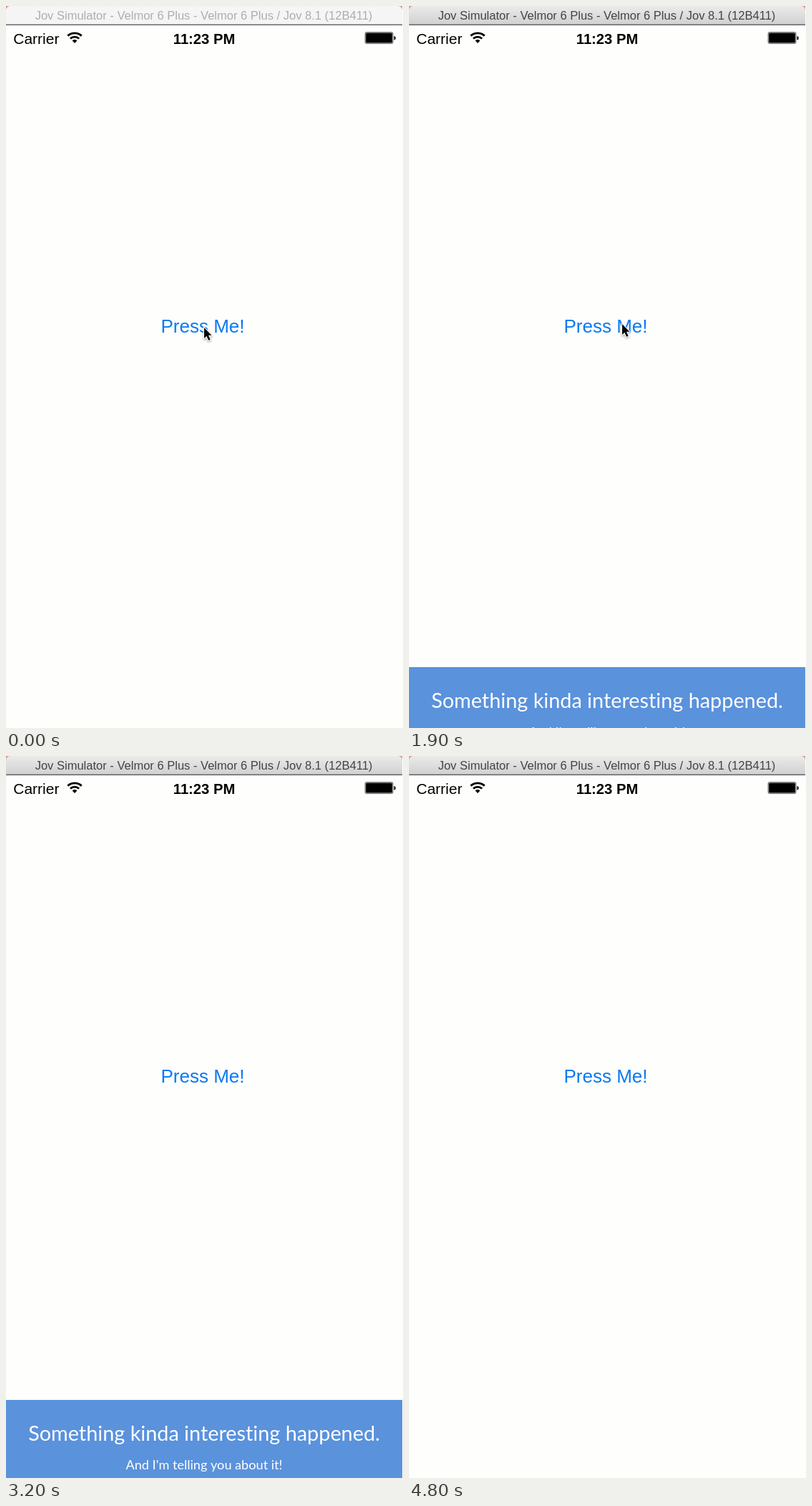
Write an HTML page with a canvas that moves like this. It is 555 by 1008 pixels and loops after 5 s.

```html
<!DOCTYPE html>
<html lang="en">
<head>
<meta charset="utf-8">
<title>Notification banner</title>
<style>
html, body { margin: 0; width: 100%; height: 100%; overflow: hidden; background: #fefefd; }
canvas { display: block; width: 555px; height: 1008px; }
</style>
</head>
<body>
<canvas id="stage" width="555" height="1008"></canvas>
<script>
const ctx = document.getElementById('stage').getContext('2d');
const W = 554, H = 1008, LOOP = 5000, STEP = 100;
const SANS = '"Liberation Sans", Arial, sans-serif';
const LATO = 'Lato, "Open Sans", sans-serif';
const BANNER_H = 137;

// Any spacing turns ligatures off.
ctx.letterSpacing = '0.01px';

const clamp = v => Math.min(1, Math.max(0, v));
const span = (t, from, to) => clamp((t - from) / (to - from));
const smooth = p => p * p * (3 - 2 * p);
const mix = (a, b, p) => a + (b - a) * p;

function text(str, x, y, font, color, align = 'center') {
  ctx.font = font;
  ctx.fillStyle = color;
  ctx.textAlign = align;
  ctx.fillText(str, x, y);
}

function box(x, y, w, h, r, color) {
  ctx.fillStyle = color;
  ctx.beginPath();
  ctx.roundRect(x, y, w, h, r);
  ctx.fill();
}

function titleBar(active) {
  ctx.fillStyle = '#d3988f';
  ctx.fillRect(0, 0, W, 8);
  const shade = ctx.createLinearGradient(0, 0, 0, 26);
  shade.addColorStop(0, active ? '#ebebeb' : '#f6f6f6');
  shade.addColorStop(1, active ? '#d0d0d0' : '#f4f4f4');
  box(0, 0, W, 26, [6, 6, 0, 0], shade);
  ctx.fillStyle = '#444';
  ctx.fillRect(0, 25.6, W, 1.2);
  text('Jov Simulator - Velmor 6 Plus - Velmor 6 Plus / Jov 8.1 (12B411)',
    276.5, 19, '16.5px ' + SANS, active ? '#434343' : '#adadad');
}

function wifi(x, y) {
  const mid = -Math.PI / 2, half = 0.75;
  ctx.fillStyle = ctx.strokeStyle = '#000';
  ctx.beginPath();
  ctx.moveTo(x, y);
  ctx.arc(x, y, 5, mid - half, mid + half);
  ctx.fill();
  ctx.lineWidth = 2.8;
  for (const r of [8.9, 14.2]) {
    ctx.beginPath();
    ctx.arc(x, y, r, mid - half, mid + half);
    ctx.stroke();
  }
}

function battery() {
  box(501.5, 36, 40, 17, 3, '#777');
  box(502.7, 37.2, 37.6, 14.6, 2, '#b4b4b4');
  box(503.2, 37.7, 36.6, 13.6, 1.5, '#000');
  box(542.3, 42, 2.5, 5.5, [0, 2.5, 2.5, 0], '#222');
}

function statusBar() {
  text('Carrier', 10.2, 52.5, '21px ' + SANS, '#000', 'left');
  text('11:23 PM', 277, 52.5, 'bold 20.2px ' + SANS, '#000');
  wifi(96, 52);
  battery();
}

function button(t) {
  const pressed = t >= 1500 && t < 1900;
  ctx.globalAlpha = pressed ? mix(0.2, 1, span(t, 1600, 1900)) : 1;
  text('Press Me!', 275, 455.5, '26px ' + SANS, '#0879f0');
  ctx.globalAlpha = 1;
}

function banner(t) {
  const shown = smooth(span(t, 1620, 2100)) - smooth(span(t, 3060, 3545));
  if (shown <= 0) return;
  const top = Math.round(H - BANNER_H * shown);
  ctx.fillStyle = '#5a92dc';
  ctx.fillRect(0, top, W, BANNER_H);
  text('Something kinda interesting happened.', 277, top + 57, '28.8px ' + LATO, '#fff');
  text("And I'm telling you about it!", 277, top + 97, '18.1px ' + LATO, '#fff');
}

function cursor(t) {
  if (t >= 3100) return;
  const p = smooth(span(t, 200, 900));
  const arrow = new Path2D('M0 0V16.2L3.7 12.7L6.6 19.4L9.4 18.2L6.5 11.7H11.4Z');
  ctx.save();
  ctx.translate(mix(277, 298, p), mix(449, 444, p));
  ctx.scale(0.92, 0.92);
  ctx.lineJoin = 'round';
  ctx.lineWidth = 2.4;
  ctx.strokeStyle = '#fff';
  ctx.shadowColor = 'rgba(0,0,0,.35)';
  ctx.shadowBlur = 3;
  ctx.shadowOffsetY = 1.5;
  ctx.stroke(arrow);
  ctx.shadowColor = 'transparent';
  ctx.fillStyle = '#000';
  ctx.fill(arrow);
  ctx.restore();
}

function draw(t) {
  ctx.fillStyle = '#fefefd';
  ctx.fillRect(0, 0, 555, H);
  titleBar(t >= 1200);
  statusBar();
  button(t);
  banner(t);
  cursor(t);
}

const start = performance.now();
function tick() {
  const t = (performance.now() - start) % LOOP;
  draw(Math.floor(t / STEP) * STEP);
  requestAnimationFrame(tick);
}
tick();
</script>
</body>
</html>
```
